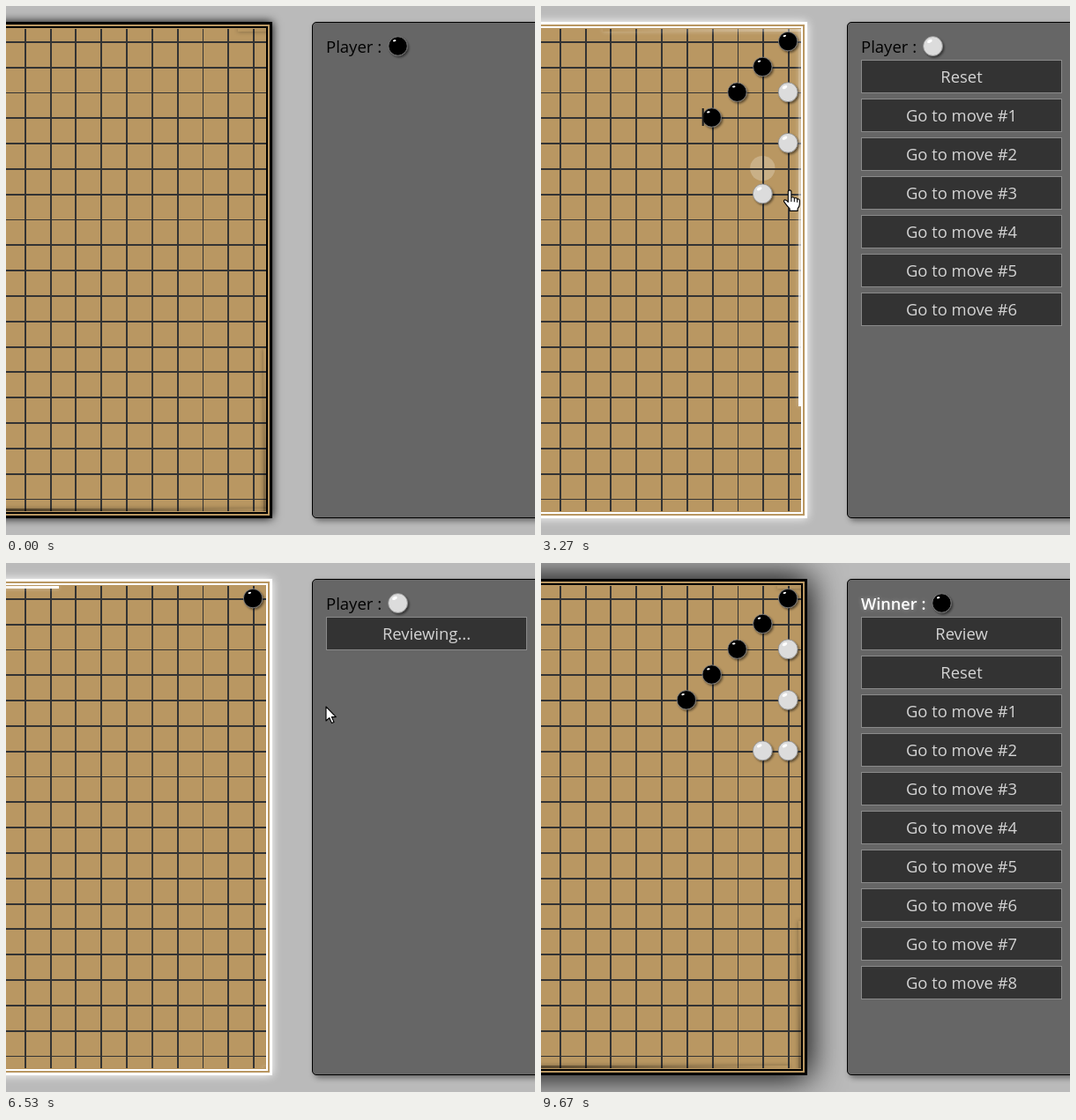
Recreate the animation shown at these times as an HTML page. Size 600 by 600 pixels, loop 9770 ms.

```html
<!DOCTYPE html>
<html lang="en">
<head>
<meta charset="utf-8">
<title>Five in a row</title>
<style>
  html, body { margin: 0; width: 100%; height: 100%; overflow: hidden; background: #bababa; }
  #stage { position: absolute; left: 0; top: 0; width: 600px; height: 600px; overflow: hidden;
    background: #bababa; font-family: "Open Sans", "Noto Sans", sans-serif; }
  #stage div, #stage svg { position: absolute; box-sizing: border-box; }
  #stage svg { left: 0; top: 0; }
  #board { left: -259px; top: 18px; width: 561px; height: 563px; background: #b99762; border: 3px solid; }
  #rim { left: 2px; top: 2px; right: 2px; bottom: 2px; border: 2px solid; }
  #track { left: -252px; top: 26px; width: 547px; height: 547px; overflow: hidden; }
  .bar { width: 547px; height: 3px; }
  #right { width: 3px; height: 547px; right: 0; }
  #bottom { bottom: 0; }
  #panel { left: 347px; top: 18px; width: 300px; height: 563px; background: #666; border: 1px solid #000;
    border-radius: 5px; box-shadow: 3px 3px 6px rgba(0,0,0,.45); }
  #label { left: 363px; top: 33px; line-height: 26px; white-space: pre; font-size: 18.5px; font-weight: 500; }
  #label.won { color: #fff; font-size: 18.2px; font-weight: 600; text-shadow: 0 0 5px #999; }
  .btn { left: 363px; width: 228px; height: 38px; border: 1px solid #8a8a8a; background: #333; color: #d4d4d4;
    font-size: 18.4px; line-height: 36px; text-align: center; }
  .btn.hot { background: #2d2d2d; color: #aaa; }
</style>
</head>
<body>
<div id="stage">
  <div id="board"><div id="rim"></div></div>
  <svg width="600" height="600"><circle id="ghost" r="14.2"/><g id="grid" fill="#333"></g></svg>
  <div id="track">
    <div class="bar" id="top"></div><div class="bar" id="right"></div><div class="bar" id="bottom"></div>
  </div>
  <div id="panel"></div>
  <div id="label"></div>
  <div id="buttons" style="left:0;top:0"></div>
  <svg width="600" height="600">
    <defs>
      <filter id="drop" x="-40%" y="-40%" width="190%" height="190%">
        <feDropShadow dx="1.6" dy="1.8" stdDeviation="1.1" flood-color="#000" flood-opacity=".5"/>
      </filter>
      <g id="black" filter="url(#drop)">
        <circle r="10.7" fill="#000" stroke="#8c8c8c" stroke-width=".8"/>
        <ellipse cx="-3.8" cy="-6.2" rx="1.8" ry="1" fill="#fff" transform="rotate(-12 -3.8 -6.2)"/>
      </g>
      <g id="white" filter="url(#drop)">
        <circle r="10.9" fill="#dcdcdc" stroke="#8f8f8f" stroke-width=".8"/>
        <ellipse cx="-3.6" cy="-5.6" rx="3" ry="1.7" fill="#fff" transform="rotate(-25 -3.6 -5.6)"/>
      </g>
    </defs>
    <g id="stones"></g>
    <rect id="caret" width="2" height="20" fill="#1c1c1c"/>
    <use id="turn" y="45.5"/>
    <g id="cursor" fill="#fff" stroke="#000" stroke-width="1.1" stroke-linejoin="round">
      <path id="hand" d="M-1.8 1.2Q0-1.2 1.8 1.2V8.5Q4 7 5.2 9.2Q7.5 8 8.5 10.2Q11 9.3 11.2 12V16Q11 19 9 21V23.5H0V21Q-3 18-6.2 13.5Q-7.3 11.5-5.5 11Q-4 10.7-1.8 13.5ZM1.8 8.5V13M5.2 9.2V13.3M8.5 10.2V13.8"/>
      <path id="arrow" d="M0 0V16L3.7 12.6L6.4 18.6L9 17.5L6.4 11.6H11.3Z"/>
    </g>
  </svg>
</div>
<script>
const $ = id => document.getElementById(id);
const LOOP = 9770, SIDE = 547, CELL = 28.8, STONES = 9, LAP = 1206;
const play = { first: 520, step: 435 }, replay = { first: 6330, step: 300 };
const ENTER = 180, LEAVE = 4290, RETURN = 4690, REVIEW = 5900, GONE = 8800;

const clamp = v => Math.max(0, Math.min(1, v));
const smooth = v => v * v * (3 - 2 * v);
const glide = (t, from, length) => smooth(clamp((t - from) / length));
const mix = (a, b, k) => a.map((v, i) => v + (b[i] - v) * k);
const timeOf = (run, i) => run.first + run.step * i;
const countAt = (run, t) => Math.max(0, Math.min(STONES, Math.floor((t - run.first) / run.step) + 1));

// cells count columns from the right and rows from the top
const place = ([c, r]) => [280.1 - CELL * c, 40.1 + CELL * r];

// black walks the diagonal, white goes down the edge and blocks in row six
function move(i) {
  const k = i >> 1;
  return i % 2 ? [k === 2 ? 1 : 0, Math.min(6, 2 * k + 2)] : [k, k];
}

// the CSS "ease" curve
function ease(x) {
  let lo = 0, hi = 1;
  for (let i = 0; i < 24; i++) {
    const s = (lo + hi) / 2, q = 1 - s;
    if (.75 * s * q + s * s * s > x) hi = s; else lo = s;
  }
  const q = 1 - lo;
  return .3 * q * q * lo + 3 * q * lo * lo + lo * lo * lo;
}

function pointer(t) {
  if (t < ENTER || t > GONE || (t > LEAVE && t < RETURN)) return null;
  if (t < LEAVE) {
    const n = countAt(play, t), tip = i => mix([2, -4], [1, 1], 0).map((d, a) => d + place(move(i))[a]);
    if (!n) return mix([320, -10], tip(0), glide(t, ENTER, 220));
    const clicked = timeOf(play, n - 1);
    return n < STONES ? mix(tip(n - 1), tip(n), glide(t, clicked, 120))
                      : mix(tip(n - 1), [-30, 200], glide(t, clicked, LEAVE - clicked));
  }
  const over = mix([440, 10], [470, 83], glide(t, RETURN, 400));
  const rest = mix(over, [363, 163], glide(t, REVIEW + 50, 450) - glide(t, 7100, 400));
  return mix(rest, [620, 130], glide(t, GONE - 500, 500));
}

const onBoard = p => p && p[0] < 296 && p[1] > 26 && p[1] < 573;
const show = (el, on) => el.setAttribute("visibility", on ? "inherit" : "hidden");

function set(el, attrs) {
  for (const k in attrs) el.setAttribute(k, attrs[k]);
  return el;
}
const svg = (tag, attrs, parent) =>
  parent.appendChild(set(document.createElementNS("http://www.w3.org/2000/svg", tag), attrs));

// lines snap to whole pixels; a few come out thin
const snap = (v, thin) => thin ? [Math.floor(v), 1] : [Math.round(v + .2) - 1, 2];
for (let i = 0; i < 19; i++) {
  const [y, height] = snap(40.8 + CELL * i, i === 2 || i === 7 || i === 18);
  svg("rect", { x: 0, y, width: 295, height }, $("grid"));
  const [x, width] = snap(280.8 - CELL * i, i === 2);
  svg("rect", { x, y: 26, width, height: SIDE }, $("grid"));
}
const stones = Array.from({ length: STONES }, (_, i) => {
  const [x, y] = place(move(i));
  return svg("use", { href: i % 2 ? "#white" : "#black", x, y }, $("stones"));
});
const buttonTop = i => 61 + 44 * i;
const buttons = Array.from({ length: STONES + 1 }, (_, i) => {
  const b = document.createElement("div");
  b.className = "btn";
  b.style.top = buttonTop(i) + "px";
  return $("buttons").appendChild(b);
});

function drawBorder(t, light, glow) {
  const tone = a => light ? `rgba(255,255,255,${a})` : `rgba(0,0,0,${a})`;
  $("board").style.borderColor = $("rim").style.borderColor = tone(1);
  $("board").style.boxShadow = `0 0 ${10 + 26 * glow}px ${3 * glow}px ${tone(1)}`;
  [["top", "left", 1, "right"], ["right", "top", 1, "bottom"], ["bottom", "left", -1, "left"]]
    .forEach(([id, side, sign, to], i) => {
      const u = (1.78 + t / LAP - i / 4) % 1, s = $(id).style;
      s[side] = sign * (2 * ease(u) - 1) * SIDE + "px";
      s.background = `linear-gradient(to ${to}, ${tone(0)}, ${tone(1)})`;
      s.boxShadow = `0 0 5px ${tone(.4)}`;
    });
}

function buttonNames(n, won, reviewing) {
  if (reviewing) return ["Reviewing..."];
  if (!n) return [];
  const steps = Array.from({ length: n - 1 }, (_, i) => "Go to move #" + (i + 1));
  return [...(won ? ["Review"] : []), "Reset", ...steps];
}

function drawPanel(n, won, reviewing, p) {
  $("label").textContent = won ? "Winner :" : "Player :";
  $("label").className = won ? "won" : "";
  set($("turn"), { href: !won && n % 2 ? "#white" : "#black", x: won ? 454.5 : 444.5 });

  const names = buttonNames(n, won, reviewing);
  const hot = p && p[0] > 363 && p[0] < 591
    ? names.findIndex((_, i) => p[1] > buttonTop(i) && p[1] < buttonTop(i) + 38) : -1;
  buttons.forEach((b, i) => {
    b.style.display = i < names.length ? "block" : "none";
    b.textContent = names[i] || "";
    b.classList.toggle("hot", hot === i);
  });
  return hot >= 0;
}

function drawPointer(p, hand) {
  show($("cursor"), p);
  if (p) set($("cursor"), { transform: `translate(${p[0]} ${p[1]})` });
  show($("hand"), hand);
  show($("arrow"), !hand);
}

// the hover mark trails the pointer; the caret blinks around each click
function drawMarks(t, n) {
  const h = pointer(t - 70), live = n < STONES && t < LEAVE && onBoard(h);
  const cell = live ? [Math.round((280 - h[0]) / CELL), Math.round((h[1] - 40) / CELL)] : [0, 0];
  const taken = stones.some((_, i) => i < n && String(move(i)) === String(cell));
  const [cx, cy] = place(cell);
  show($("ghost"), live && !taken);
  set($("ghost"), { cx, cy, fill: n % 2 ? "rgba(255,255,255,.24)" : "rgba(0,0,0,.2)" });

  const last = countAt(play, t + 90) - 1;
  const [x, y] = place(move(Math.max(0, last)));
  show($("caret"), last >= 0 && t < timeOf(play, last) + 300);
  set($("caret"), { x: x - 11, y: y - 10.5 });
}

function draw(t) {
  const run = t < REVIEW ? play : replay;
  const n = countAt(run, t), won = n === STONES, reviewing = run === replay && !won;
  const p = pointer(t);
  stones.forEach((s, i) => show(s, i < n));
  drawBorder(t, !won && n % 2, glide(t, timeOf(run, STONES - 1), 500));
  const onButton = drawPanel(n, won, reviewing, p);
  drawPointer(p, onBoard(p) || (onButton && !reviewing));
  drawMarks(t, n);
}

const start = performance.now();
function tick() {
  draw((performance.now() - start) % LOOP);
  requestAnimationFrame(tick);
}
tick();
</script>
</body>
</html>
```
